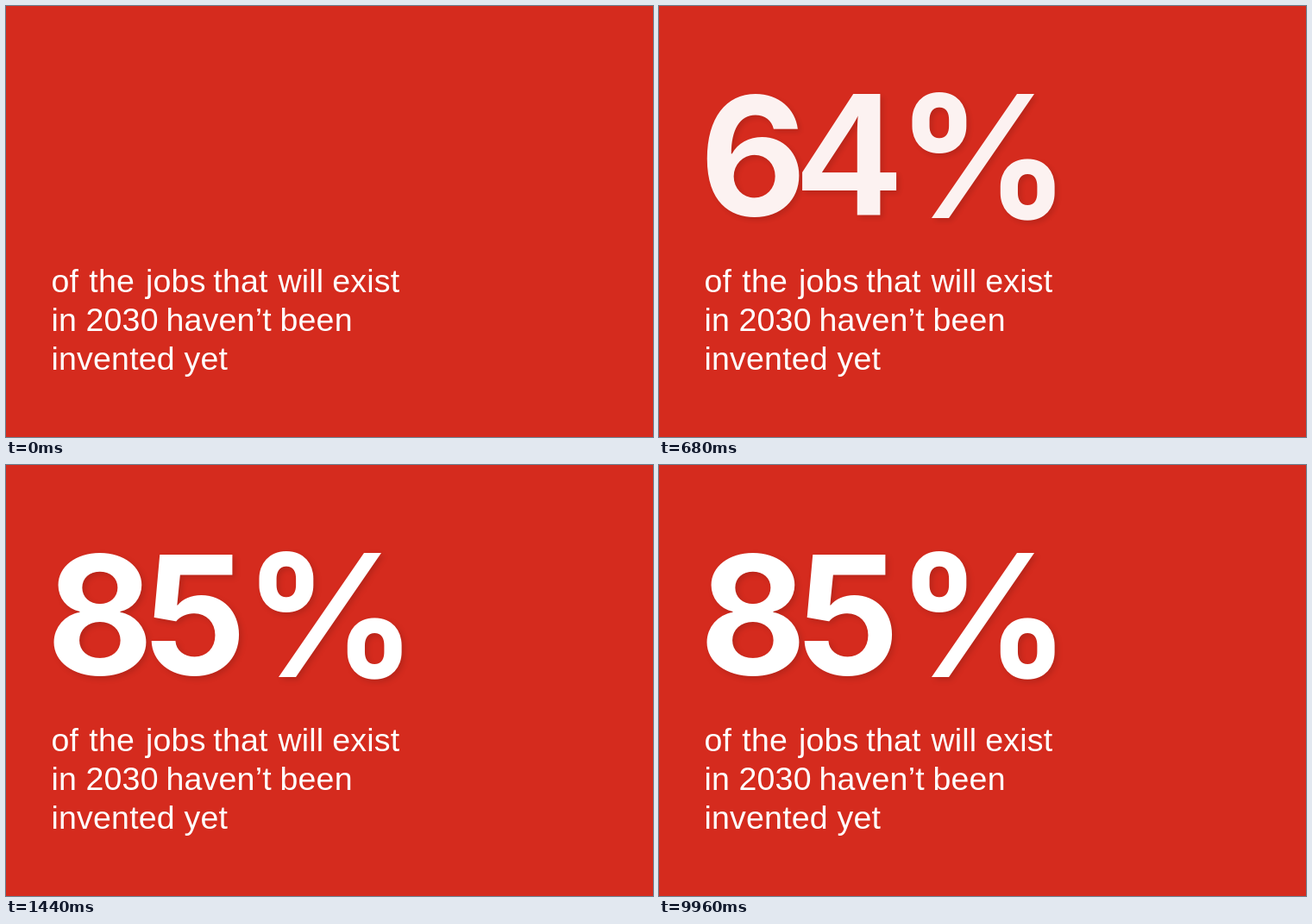
These frames come from a looping animation (750x500 px, 10 s). An HTML page:

```html
<!DOCTYPE html>
<html lang="en">
<head>
<meta charset="utf-8">
<title>Jobs in 2030</title>
<style>
  html, body { margin: 0; width: 100%; height: 100%; overflow: hidden; background: #d52b1e; }
  svg { display: block; width: 750px; height: 500px; fill: #fff; }
  .copy { font: 400 37.5px "Liberation Sans", Arial, sans-serif; letter-spacing: .2px; }
  .figure {
    font: 700 191px Inter, "Liberation Sans", sans-serif;
    text-anchor: middle;
    filter: drop-shadow(3px 3px 3px rgba(0, 0, 0, .14));
  }
  .figure .narrow { font: 700 203.5px "Liberation Sans", Arial, sans-serif; }
  .figure .percent { font-size: 198px; }
</style>
</head>
<body>
<svg viewBox="0 0 750 500">
  <g id="figure" class="figure" opacity="0">
    <text class="digit" x="109" y="243">8</text>
    <text class="digit" x="219.5" y="243">5</text>
    <text class="percent" x="376" y="245.5">%</text>
  </g>
  <g class="copy">
    <text y="332"><tspan x="52.5">of </tspan><tspan x="96.3">the </tspan><tspan x="162">jobs </tspan><tspan x="240.3">that </tspan><tspan x="315.5">will </tspan><tspan x="378.3">exist</tspan></text>
    <text y="377"><tspan x="52.5">in </tspan><tspan x="92.5">2030 </tspan><tspan x="185.5">haven’t </tspan><tspan x="317.5">been</tspan></text>
    <text y="422"><tspan x="52.5">invented </tspan><tspan x="206.5">yet</tspan></text>
  </g>
</svg>
<script>
const LOOP = 10000, STEP = 40, GOAL = 85;
const START = 282, SLOW = 680, DONE = 1440;
const FADE = [[290, 0], [520, .6], [680, .94], [760, 1]];

const figure = document.getElementById('figure');
const digits = document.querySelectorAll('.digit');

// Fast exponential rise, then a quadratic settle.
function count(t) {
  if (t >= DONE) return GOAL;
  const left = t < SLOW
    ? GOAL * Math.exp(-.00352 * Math.max(0, t - START))
    : 3.53e-5 * (DONE + 10 - t) ** 2;
  return Math.floor(GOAL - left);
}

function fade(t) {
  if (t <= FADE[0][0]) return 0;
  for (let i = 1; i < FADE.length; i++) {
    const [t0, a] = FADE[i - 1], [t1, b] = FADE[i];
    if (t < t1) return a + (b - a) * (t - t0) / (t1 - t0);
  }
  return 1;
}

function draw(t) {
  const label = String(count(t)).padStart(2, '0');
  digits.forEach((el, i) => {
    if (el.textContent !== label[i]) el.textContent = label[i];
    el.classList.toggle('narrow', label[i] === '4');
  });
  figure.setAttribute('opacity', fade(t));
}

const origin = performance.now();
function tick() {
  const t = (performance.now() - origin) % LOOP;
  draw(Math.floor(t / STEP) * STEP);
  requestAnimationFrame(tick);
}
tick();
</script>
</body>
</html>
```
